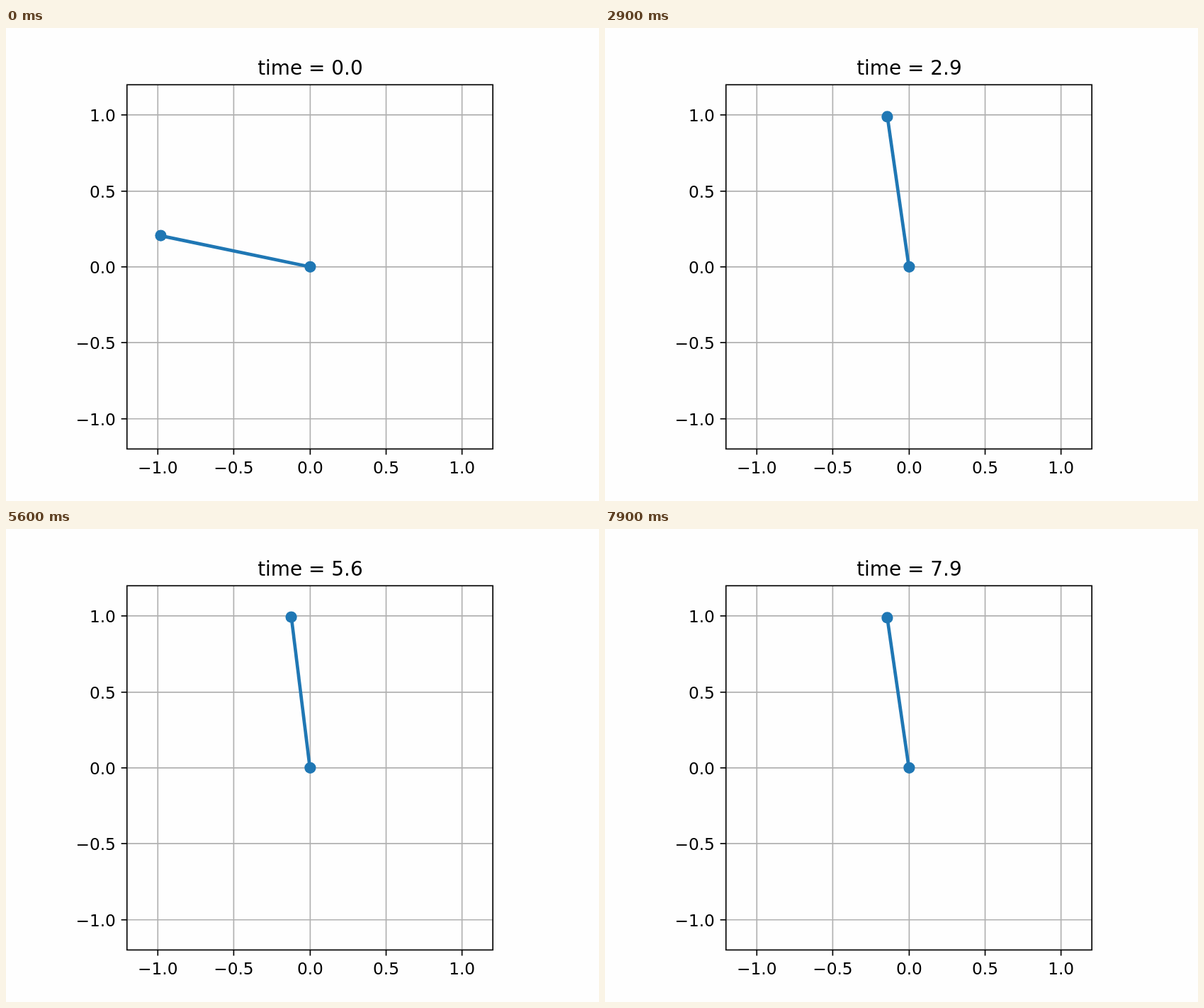
An HTML page with a canvas for the animation above (8000 ms loop, 837 by 669 pixels).

```html
<!DOCTYPE html>
<html lang="en">
<head>
<meta charset="utf-8">
<title>Pendulum</title>
<style>
html, body { margin: 0; width: 100%; height: 100%; overflow: hidden; background: #fefefe; }
canvas { display: block; }
</style>
</head>
<body>
<canvas id="stage" width="837" height="669"></canvas>
<script>
const ctx = document.getElementById('stage').getContext('2d');
const LOOP = 8000, STEP = 100;

// Plot geometry on a 1000 x 800 figure
const left = 204, right = 821, upper = 96, lower = 712;
const cx = 512.5, cy = 404, unit = 616 / 2.4;
const blue = '#1f77b4', gray = '#b0b0b0', black = '#000';

// Counter-clockwise angle from upright: one swing up, then a slow sway around a slight lean
function angleAt(t) {
  const swing = 289.2 * Math.exp(-((t / 0.6197) ** 1.8));
  const sway = 0.6 * Math.cos(2 * Math.PI * (t - 3.25) / 4.7);
  return (367.6 + sway - swing) * Math.PI / 180;
}

function line(x0, y0, x1, y1, color, width = 2) {
  ctx.strokeStyle = color;
  ctx.lineWidth = width;
  ctx.beginPath();
  ctx.moveTo(x0, y0);
  ctx.lineTo(x1, y1);
  ctx.stroke();
}

function dot(x, y) {
  ctx.fillStyle = blue;
  ctx.beginPath();
  ctx.arc(Math.round(x), Math.round(y), 9.72, 0, 2 * Math.PI);
  ctx.fill();
}

function label(text, x, y, align, size) {
  ctx.font = `${size}px "DejaVu Sans", sans-serif`;
  ctx.textAlign = align;
  ctx.fillStyle = black;
  ctx.fillText(text, x, y);
}

function drawAxes() {
  for (let v = -1; v <= 1; v += 0.5) {
    const x = Math.round(cx + v * unit), y = Math.round(cy - v * unit);
    const text = v.toFixed(1).replace('-', '\u2212');
    line(x, upper, x, lower, gray);
    line(left, y, right, y, gray);
    line(x, lower, x, lower + 9.7, black);
    line(left, y, left - 9.7, y, black);
    label(text, x, 753, 'center', 27.78);
    label(text, 185, Math.ceil(cy - v * unit + 10.5), 'right', 27.78);
  }
}

function draw(t) {
  ctx.setTransform(0.837, 0, 0, 0.83625, 0, 0);
  ctx.fillStyle = '#fefefe';
  ctx.fillRect(0, 0, 1000, 800);
  drawAxes();

  const a = angleAt(t);
  const x = cx - Math.sin(a) * unit, y = cy - Math.cos(a) * unit;
  line(cx, cy, x, y, blue, 5.56);
  dot(cx, cy);
  dot(x, y);

  ctx.strokeStyle = black;
  ctx.lineWidth = 2;
  ctx.strokeRect(left, upper, right - left, lower - upper);
  label('time = ' + t.toFixed(1), 513, 79.5, 'center', 33.33);
}

const start = performance.now();
function tick() {
  const ms = (performance.now() - start) % LOOP;
  draw(Math.floor(ms / STEP) * STEP / 1000);
  requestAnimationFrame(tick);
}
tick();
</script>
</body>
</html>
```
